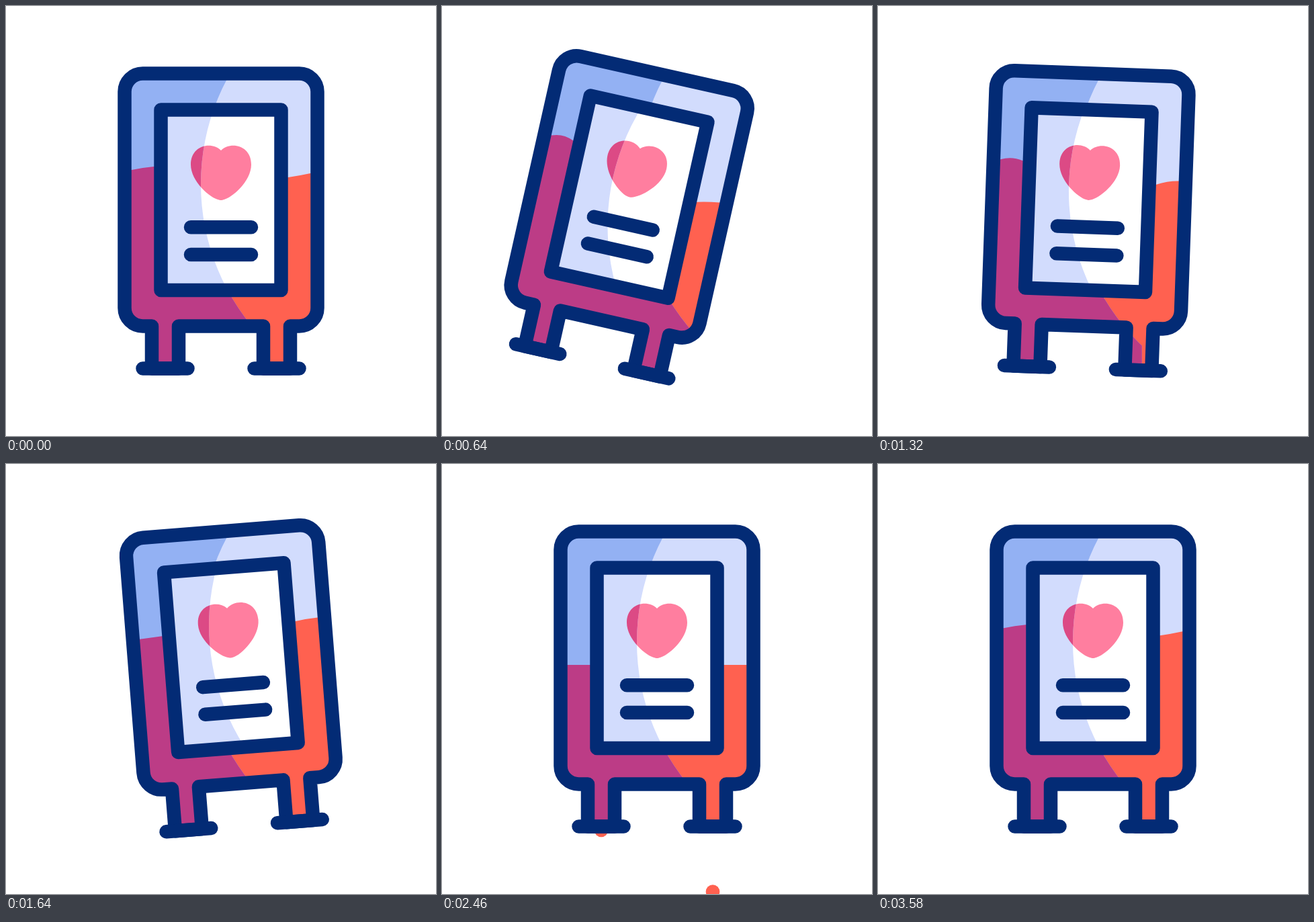
These frames come from a looping animation (640 px wide and 640 px high, 3.6 s). An HTML page with a canvas:

```html
<!DOCTYPE html>
<html lang="en">
<head>
<meta charset="utf-8">
<style>
  html, body { margin: 0; width: 100%; height: 100%; overflow: hidden; background: #fff; }
  canvas { display: block; width: 640px; height: 640px; }
</style>
</head>
<body>
<canvas id="stage" width="640" height="640"></canvas>
<script>
const ctx = document.getElementById('stage').getContext('2d');
const LOOP = 3600;
const PIVOT = { x: 320, y: 100.4 };
const STROKE = 20.5;
const COLOR = {
  navy: '#032b75', light: '#d2dcfd', blue: '#93b1f3', red: '#ff6150',
  plum: '#bc3c86', pink: '#ff7e9f', rose: '#dc4a85', yellow: '#ffcc52'
};

// Keyframes: [time, ...values]
const SWING = [[0, 0], [300, -16], [575, 16], [870, -10], [1175, 5], [1580, -5], [1900, 0]];
const LEVEL = [[2020, 0], [2920, 107], [2972, 107], [3600, 0]];
// Surface heights: three across the left strip, three across the right one.
const REST = [244, 241, 239, 255, 252.3, 249];
const FLAT = [247, 247, 247, 247, 247, 247];
const SURFACE = [
  [0, ...REST],
  [315, 270.6, 268.4, 267.3, 216.8, 207, 204],
  [630, 224.6, 221.3, 225.1, 274.3, 270.5, 267.7],
  [880, 262, 261, 258, 230, 223, 219],
  [1290, 232.6, 230, 233.4, 262.8, 258.2, 256.4],
  [1600, 251, 250, 249, 242, 240, 239],
  [1920, ...FLAT],
  [2972, ...FLAT],
  [LOOP, ...REST]
];
const DROPS = [[237, 1910], [403, 2148], [237, 2387], [403, 2625]];

const clamp = v => Math.min(1, Math.max(0, v));
const smooth = v => { const u = clamp(v); return u * u * (3 - 2 * u); };
const mix = (a, b, u) => a + (b - a) * u;

function keyed(keys, t) {
  let i = 0;
  while (i < keys.length - 2 && t >= keys[i + 1][0]) i++;
  const [t0, ...a] = keys[i], [t1, ...b] = keys[i + 1];
  const u = smooth((t - t0) / (t1 - t0));
  return a.map((v, k) => mix(v, b[k], u));
}

const bag = new Path2D(`M203.5 100.5H436.5A27 27 0 0 1 463.5 127.5V449.5
  A27 27 0 0 1 436.5 476.5H423V539.5H383V476.5H257V539.5H217V476.5H203.5
  A27 27 0 0 1 176.5 449.5V127.5A27 27 0 0 1 203.5 100.5Z`);
const feet = new Path2D('M203.5 539.5H270.5M369.5 539.5H436.5');
const poster = new Path2D('M230.5 154.5H409.5V423H230.5Z');
const textLines = new Path2D('M275 329.3H365M275 370H365');
const heart = new Path2D(`M320 215C306 201 275 207 275 236C275 261 304 286 317 288.6
  Q320 289.6 323 288.6C336 286 365 261 365 236C365 207 334 201 320 215Z`);

const shade = new Path2D();
shade.moveTo(0, 0);
shade.arc(623, 265, 333, Math.PI * 1.25, Math.PI * 0.743, true);
shade.lineTo(393, 640);
shade.lineTo(0, 640);
shade.closePath();

function rotateBag(angle) {
  ctx.translate(PIVOT.x, PIVOT.y);
  ctx.rotate(angle);
  ctx.translate(-PIVOT.x, -PIVOT.y);
}

function fill(path, color) {
  ctx.fillStyle = color;
  ctx.fill(path);
}

function stroke(path, color = COLOR.navy) {
  ctx.strokeStyle = color;
  ctx.stroke(path);
}

function liquidPath(t) {
  const drop = t < 2000 ? 0 : keyed(LEVEL, t)[0];
  const y = keyed(SURFACE, t).map(v => v + drop);
  const through = (a, m, b) => 2 * m - (a + b) / 2;
  const p = new Path2D();
  p.moveTo(160, y[0]);
  p.lineTo(187, y[0]);
  p.quadraticCurveTo(203.5, through(y[0], y[1], y[2]), 220, y[2]);
  p.lineTo(420, y[3]);
  p.quadraticCurveTo(436.5, through(y[3], y[4], y[5]), 453, y[5]);
  p.lineTo(480, y[5]);
  p.lineTo(480, 560);
  p.lineTo(160, 560);
  p.closePath();
  return p;
}

function drawDrops(t) {
  ctx.fillStyle = COLOR.red;
  for (const [x, start] of DROPS) {
    const age = t - start;
    if (age < 0 || age > 400) continue;
    ctx.beginPath();
    ctx.arc(x, 539.5 + 0.00099 * age * age, 10.3, 0, Math.PI * 2);
    ctx.fill();
  }
}

// The shade on the bag stays still while the bag swings below it.
function drawContents(angle, liquid) {
  ctx.save();
  rotateBag(angle);
  ctx.clip(bag);
  fill(bag, COLOR.light);
  fill(liquid, COLOR.red);
  rotateBag(-angle);
  ctx.clip(shade);
  rotateBag(angle);
  fill(bag, COLOR.blue);
  fill(liquid, COLOR.plum);
  ctx.restore();
}

function drawPoster() {
  fill(poster, '#fff');
  fill(heart, COLOR.pink);
  ctx.save();
  ctx.clip(poster);
  ctx.clip(shade);
  fill(poster, COLOR.light);
  fill(heart, COLOR.rose);
  ctx.restore();
  stroke(poster);
  stroke(textLines);
}

function drawTrail(t, from, to, radius, growth) {
  const head = smooth((t - 220) / 220), tail = smooth((t - 320) / 220);
  if (head <= tail) return;
  const p = new Path2D();
  for (let i = 0; i <= 20; i++) {
    const deg = mix(from, to, mix(tail, head, i / 20));
    const r = radius + growth * (deg - from), a = deg * Math.PI / 180;
    p.lineTo(PIVOT.x + r * Math.cos(a), PIVOT.y + r * Math.sin(a));
  }
  stroke(p, COLOR.yellow);
}

function draw(t) {
  const angle = keyed(SWING, t)[0] * Math.PI / 180;
  ctx.fillStyle = '#fff';
  ctx.fillRect(0, 0, 640, 640);
  ctx.lineWidth = STROKE;
  ctx.lineCap = ctx.lineJoin = 'round';

  drawDrops(t);
  drawContents(angle, liquidPath(t));
  ctx.save();
  rotateBag(angle);
  stroke(bag);
  stroke(feet);
  drawPoster();
  ctx.restore();
  drawTrail(t, 116.5, 150, 238, 0.6);
  drawTrail(t, 115.1, 143, 280, 0.73);
}

const began = performance.now();
function tick() {
  draw((performance.now() - began) % LOOP);
  requestAnimationFrame(tick);
}
tick();
</script>
</body>
</html>
```
